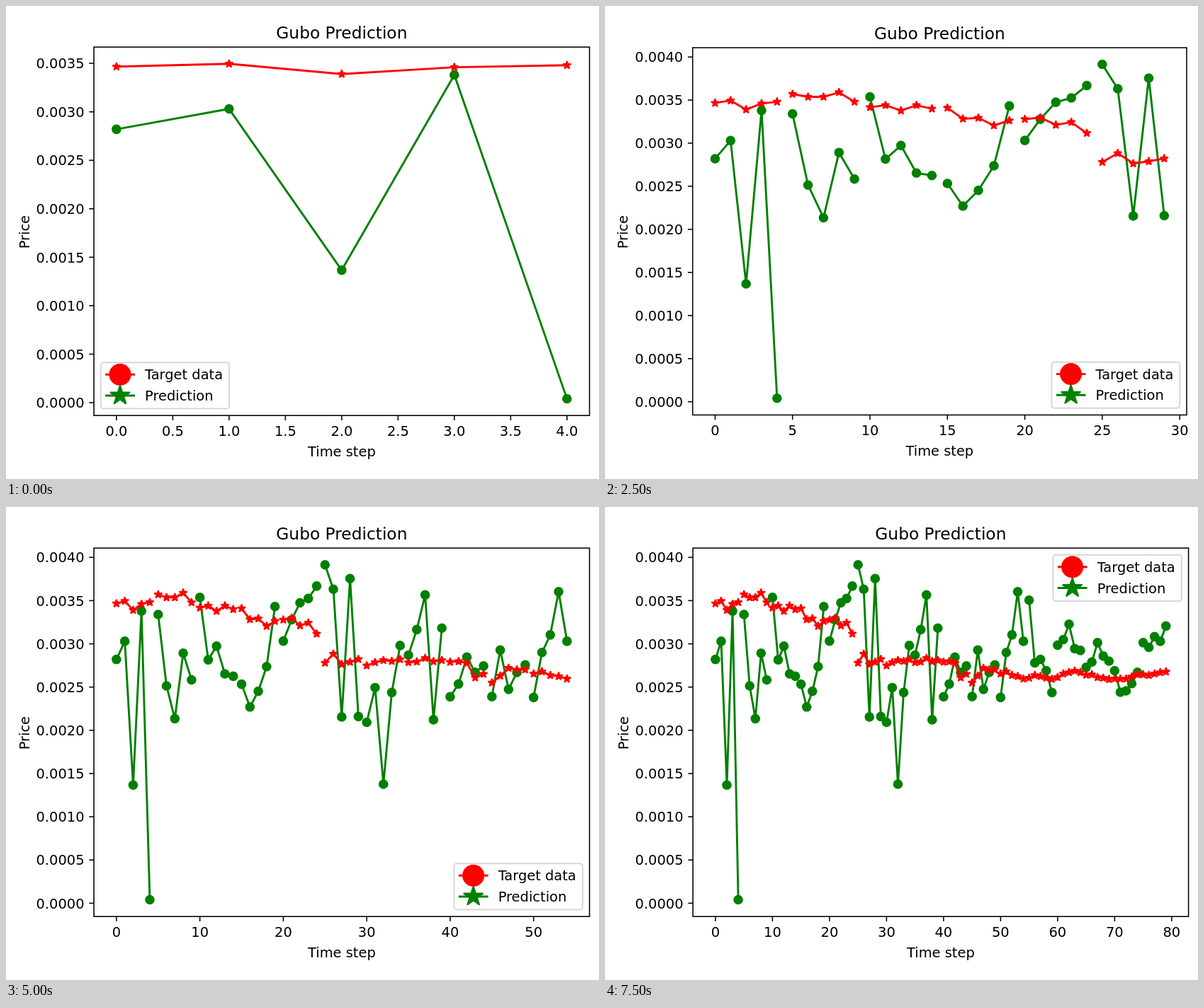
Write an HTML page with a canvas that moves like this. It is 837 px wide and 669 px high and loops after 8 s.

```html
<!DOCTYPE html>
<html lang="en">
<head>
<meta charset="utf-8">
<title>Price prediction chart</title>
<style>
  html, body { margin: 0; width: 100%; height: 100%; overflow: hidden; background: #fff; }
  canvas { display: block; }
</style>
</head>
<body>
<canvas id="stage" width="837" height="669"></canvas>
<script>
const W = 837, H = 669;
const STEP_MS = 500, STEPS = 16, BATCH = 5;
const PT = 1.944;
const RED = '#ff0000', GREEN = '#008000';
const box = { l: 124.1, r: 823.6, t: 58.1, b: 579.2 };
const ctx = document.getElementById('stage').getContext('2d');

// Prices in units of 0.00001
const target = [
  346.6, 349.5, 339, 346, 348,      357, 353.7, 353.7, 359, 347.9,
  341.7, 344, 337.8, 344, 340,      341, 328.2, 329.3, 320.5, 326.3,
  327.8, 329.7, 321.2, 324.3, 311.6, 278, 288.3, 276.4, 278.9, 282.2,
  274.8, 278.5, 281, 280, 282,      278.5, 279.3, 283.4, 279.7, 281,
  279, 279.7, 277.7, 260.9, 265,    255, 263, 272, 270, 270.3,
  265.4, 268, 263.7, 262.5, 259.5,  260.5, 263.7, 262.5, 260.5, 259.2,
  261.3, 265.4, 267, 268.7, 267,    264, 264.5, 261.3, 260.5, 259,
  259.7, 259.5, 259.5, 262, 264.5,  264.5, 263.7, 265.4, 267, 267.8
];
const predicted = [
  282, 303, 136.7, 338, 4,          334, 251.4, 213.5, 289.2, 258.3,
  353.7, 281.5, 297.3, 265.3, 262.5, 253.3, 227, 245.2, 273.7, 343.2,
  303.2, 327.8, 347.5, 352.5, 366.8, 391.4, 363.2, 215.5, 375.5, 215.9,
  209.3, 249.4, 137.7, 243.7, 298.1, 287, 316.5, 356.6, 212.2, 318.2,
  238.8, 253.5, 284.6, 267, 274.4,  239, 292.8, 247.4, 267, 275.6,
  238, 290, 310.4, 360.3, 303,      350.5, 278, 282, 269, 243.7,
  298.5, 305, 322.7, 294.4, 292.4,  272.8, 279, 301.4, 285.8, 280,
  269, 244, 245.7, 254, 267,        301.4, 296, 308.3, 303, 320.6
];

// Linear axis with 5% margins and at most nine "nice" intervals
function makeAxis(min, max, from, to) {
  const pad = (max - min) * 0.05, lo = min - pad, hi = max + pad;
  const raw = (hi - lo) / 9, mag = 10 ** Math.floor(Math.log10(raw));
  const step = [1, 2, 2.5, 5, 10].find(k => k * mag >= raw) * mag;
  const ticks = [];
  for (let i = Math.ceil(lo / step); i * step <= hi; i++) ticks.push(i * step);
  return { step, ticks, at: v => from + (v - lo) / (hi - lo) * (to - from) };
}

function text(str, x, y, align = 'center', size = 10) {
  ctx.font = `${size * PT}px "DejaVu Sans", sans-serif`;
  ctx.textAlign = align;
  ctx.fillStyle = '#000';
  ctx.fillText(str, x, y);
}

function polyline(points, color, width, cap = 'square') {
  ctx.beginPath();
  points.forEach(([x, y]) => ctx.lineTo(x, y));
  ctx.strokeStyle = color;
  ctx.lineWidth = width * PT;
  ctx.lineCap = cap;
  ctx.lineJoin = 'round';
  ctx.stroke();
}

function paintMarker(color) {
  ctx.fillStyle = ctx.strokeStyle = color;
  ctx.lineWidth = PT;
  ctx.fill();
  ctx.stroke();
}

function disc(x, y, size, color) {
  ctx.beginPath();
  ctx.arc(x, y, size * PT / 2, 0, Math.PI * 2);
  paintMarker(color);
}

function star(x, y, size, color) {
  ctx.beginPath();
  for (let i = 0; i < 10; i++) {
    const r = size * PT / 2 * (i % 2 ? 0.381966 : 1), a = i * Math.PI / 5;
    ctx.lineTo(x + r * Math.sin(a), y - r * Math.cos(a));
  }
  ctx.closePath();
  ctx.lineJoin = 'bevel';
  paintMarker(color);
}

function series(data, start, ax, ay, color, marker) {
  const pts = data.slice(start, start + BATCH).map((v, i) => [ax.at(start + i), ay.at(v)]);
  polyline(pts, color, 1.5);
  pts.forEach(([x, y]) => marker(x, y, 6, color));
}

function drawAxes(ax, ay) {
  const tick = 3.5 * PT, digits = ax.step % 1 ? 1 : 0;
  for (const v of ax.ticks) {
    const x = ax.at(v);
    polyline([[x, box.b], [x, box.b + tick]], '#000', 0.8, 'butt');
    text(v.toFixed(digits), x, 608);
  }
  for (const v of ay.ticks) {
    const y = ay.at(v);
    polyline([[box.l - tick, y], [box.l, y]], '#000', 0.8, 'butt');
    text((v / 1e5).toFixed(4), box.l - 2 * tick, y + 7.2, 'right');
  }
  ctx.strokeStyle = '#000';
  ctx.lineWidth = 0.8 * PT;
  ctx.lineJoin = 'miter';
  ctx.strokeRect(box.l, box.t, box.r - box.l, box.b - box.t);

  const cx = (box.l + box.r) / 2;
  text('Gubo Prediction', cx, 46.4, 'center', 12);
  text('Time step', cx, 636.5);
  ctx.save();
  ctx.translate(32.6, (box.t + box.b) / 2 + 1);
  ctx.rotate(-Math.PI / 2);
  text('Price', 0, 0);
  ctx.restore();
}

function legendRow(x, y, label, color, marker) {
  polyline([[x + 7.8, y], [x + 46.7, y]], color, 1.5);
  marker(x + 27.2, y, 15, color);
  text(label, x + 62.2, y + 7.2, 'left');
}

function drawLegend(step) {
  const w = 181.4, h = 65.2, gap = 5 * PT;
  const x = step < 3 ? box.l + gap : box.r - gap - w;
  const y = step < 14 ? box.b - gap - h : box.t + gap;
  ctx.beginPath();
  ctx.roundRect(x, y, w, h, 3.9);
  ctx.fillStyle = 'rgba(255,255,255,.8)';
  ctx.fill();
  ctx.strokeStyle = 'rgba(204,204,204,.8)';
  ctx.lineWidth = PT;
  ctx.stroke();
  legendRow(x, y + 16.9, 'Target data', RED, disc);
  legendRow(x, y + 46.7, 'Prediction', GREEN, star);
}

function draw(step) {
  const count = (step + 1) * BATCH;
  const shown = target.slice(0, count).concat(predicted.slice(0, count));
  const ax = makeAxis(0, count - 1, box.l, box.r);
  const ay = makeAxis(Math.min(...shown), Math.max(...shown), box.b, box.t);

  ctx.setTransform(1, 0, 0, 1, 0, 0);
  ctx.fillStyle = '#fff';
  ctx.fillRect(0, 0, W, H);

  // The figure shrinks when the last tick label sticks out on the right
  const labelEnd = ax.at(ax.ticks[ax.ticks.length - 1]) + 12.5;
  const s = W / (W + Math.max(0, labelEnd - box.r));
  ctx.setTransform(s, 0, 0, s, 0, H * (1 - s) / 2);

  for (let i = 0; i < count; i += BATCH) {
    series(predicted, i, ax, ay, GREEN, disc);
    series(target, i, ax, ay, RED, star);
  }
  drawAxes(ax, ay);
  drawLegend(step);
}

const begin = performance.now();
let last = -1;
function tick() {
  const step = Math.floor((performance.now() - begin) / STEP_MS) % STEPS;
  if (step !== last) draw(last = step);
  requestAnimationFrame(tick);
}
tick();
</script>
</body>
</html>
```
